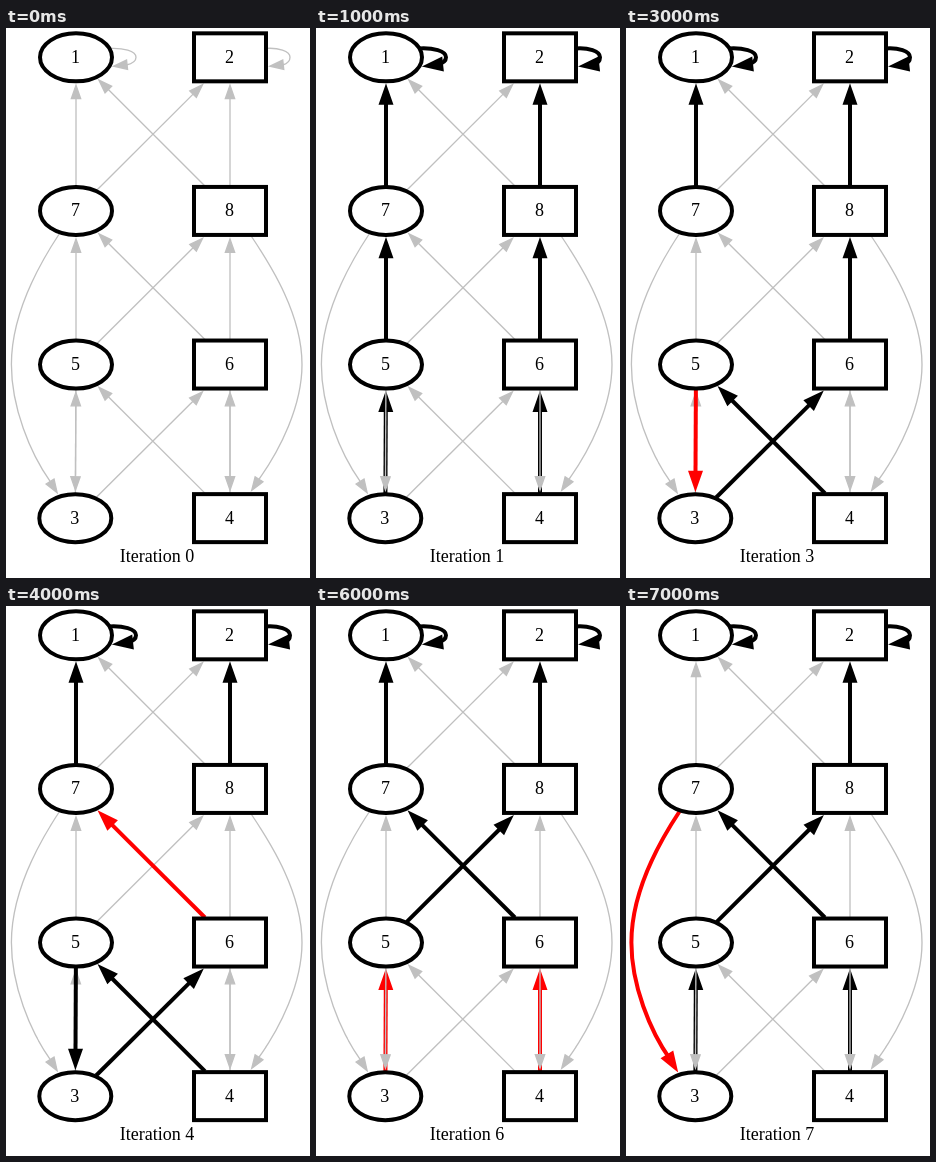
Animation, 304 px wide and 550 px high, one loop 8000 ms. Source, as an HTML page:

```html
<!DOCTYPE html>
<html lang="en">
<head>
<meta charset="utf-8">
<title>Iterations</title>
<style>
  html, body { margin: 0; width: 100%; height: 100%; overflow: hidden; background: #fff; }
  svg { display: block; }
  text { font: 18px "Liberation Serif", "Times New Roman", serif; text-anchor: middle; fill: #000; }
  .node { fill: #fff; stroke: #000; stroke-width: 4; }
  .line { fill: none; }
  .head { stroke-linejoin: miter; stroke-miterlimit: 10; }
</style>
</head>
<body>
<svg id="stage" width="304" height="550" viewBox="0 0 304 550"></svg>
<script>
const stage = document.getElementById('stage');
const GRAY = '#c0c0c0', BLACK = '#000', RED = '#f00';
const STEP = 1000;

const L = 70, R = 224;
const rows = [29.33, 182.93, 336.53, 490.13];
const nodes = {
  1: [L, rows[0]], 2: [R, rows[0]],
  7: [L, rows[1]], 8: [R, rows[1]],
  5: [L, rows[2]], 6: [R, rows[2]],
  3: [L - 0.7, rows[3]], 4: [R, rows[3]]
};
const isRound = id => id % 2 === 1;

// Chosen edges per iteration; "!" marks a fresh switch.
const steps = [
  '',
  '11 22 35 46 57 68 71 82',
  '11 22 36! 45! 57 68 71 82',
  '11 22 36 45 53! 68 71 82',
  '11 22 36 45 53 67! 71 82',
  '11 22 36 45 58! 67 71 82',
  '11 22 35! 46! 58 67 71 82',
  '11 22 35 46 58 67 73! 82'
].map(s => s.split(' '));

function add(tag, attrs, text) {
  const el = document.createElementNS('http://www.w3.org/2000/svg', tag);
  for (const k in attrs) el.setAttribute(k, attrs[k]);
  if (text !== undefined) el.textContent = text;
  return stage.appendChild(el);
}

// Point where the ray from a node's centre leaves its outline, grown by pad.
function border(id, dx, dy, pad) {
  const [x, y] = nodes[id], a = 36 + pad, b = 24 + pad;
  const t = isRound(id)
    ? 1 / Math.hypot(dx / a, dy / b)
    : Math.min(a / Math.abs(dx || 1e-9), b / Math.abs(dy || 1e-9));
  return [x + dx * t, y + dy * t];
}

// Curved edges: path, arrow tip, direction of the arrow.
const curves = {
  11: ['M104 20.4C116.7 19.8 130 22.8 130 29.3C130 33.4 126 35.8 120.3 37', [105.8, 38.4], [-1, 0.11]],
  22: ['M260 20.4C272 19.6 284 22.8 284 29.3C284 33.4 281 35.8 276.7 37', [262, 38.4], [-1, 0.11]],
  73: ['M53.5 205.5C32 238 5.4 287 5.4 336.5C5.4 379 24 425 44.3 453.6', [52.2, 466.5], [0.53, 0.85]],
  84: ['M244.5 207C266 239 296 287 296 336.5C296 378 274 422 252.8 451.5', [244.6, 464.1], [-0.55, 0.835]]
};

function straight(id) {
  const [from, to] = id;
  const dx = nodes[to][0] - nodes[from][0], dy = nodes[to][1] - nodes[from][1];
  const len = Math.hypot(dx, dy), u = [dx / len, dy / len];
  const a = border(from, u[0], u[1], 1), tip = border(to, -u[0], -u[1], 2);
  return [`M${a}L${tip[0] - u[0] * 15.3} ${tip[1] - u[1] * 15.3}`, tip, u];
}

// The mitred outline of the head ends exactly at the tip.
function headPoints(tip, [dx, dy], w) {
  const n = Math.hypot(dx, dy), ux = dx / n, uy = dy / n;
  const back = w / 2 / 0.3304, base = back + 13.33, half = 4.67;
  const at = (d, s) => `${tip[0] - ux * d - uy * s},${tip[1] - uy * d + ux * s}`;
  return [at(back, 0), at(base, half), at(base, -half)].join(' ');
}

const edges = '11 22 35 36 45 46 53 57 58 64 67 68 71 72 73 81 82 84'.split(' ').map(id => {
  const [d, tip, dir] = curves[id] || straight(id);
  return { id, tip, dir, line: add('path', { class: 'line', d }), head: add('polygon', { class: 'head' }) };
});

for (const id in nodes) {
  const [x, y] = nodes[id];
  if (isRound(id)) add('ellipse', { class: 'node', cx: x, cy: y, rx: 36, ry: 24 });
  else add('rect', { class: 'node', x: x - 36, y: y - 24, width: 72, height: 48 });
  add('text', { x: x - 0.5, y: y + 5.4 }, id);
}
const label = add('text', { x: 151, y: 534 });

function show(i) {
  for (const { id, tip, dir, line, head } of edges) {
    const fresh = steps[i].includes(id + '!');
    const on = fresh || steps[i].includes(id);
    const color = fresh ? RED : on ? BLACK : GRAY, w = on ? 4 : 1.33;
    for (const el of [line, head]) {
      el.setAttribute('stroke', color);
      el.setAttribute('stroke-width', w);
    }
    head.setAttribute('fill', color);
    head.setAttribute('points', headPoints(tip, dir, w));
  }
  label.textContent = 'Iteration ' + i;
}

let shown = 0;
show(0);
const start = performance.now();
function tick() {
  const i = Math.floor(Math.max(0, performance.now() - start) / STEP) % steps.length;
  if (i !== shown) show(shown = i);
  requestAnimationFrame(tick);
}
requestAnimationFrame(tick);
</script>
</body>
</html>
```
